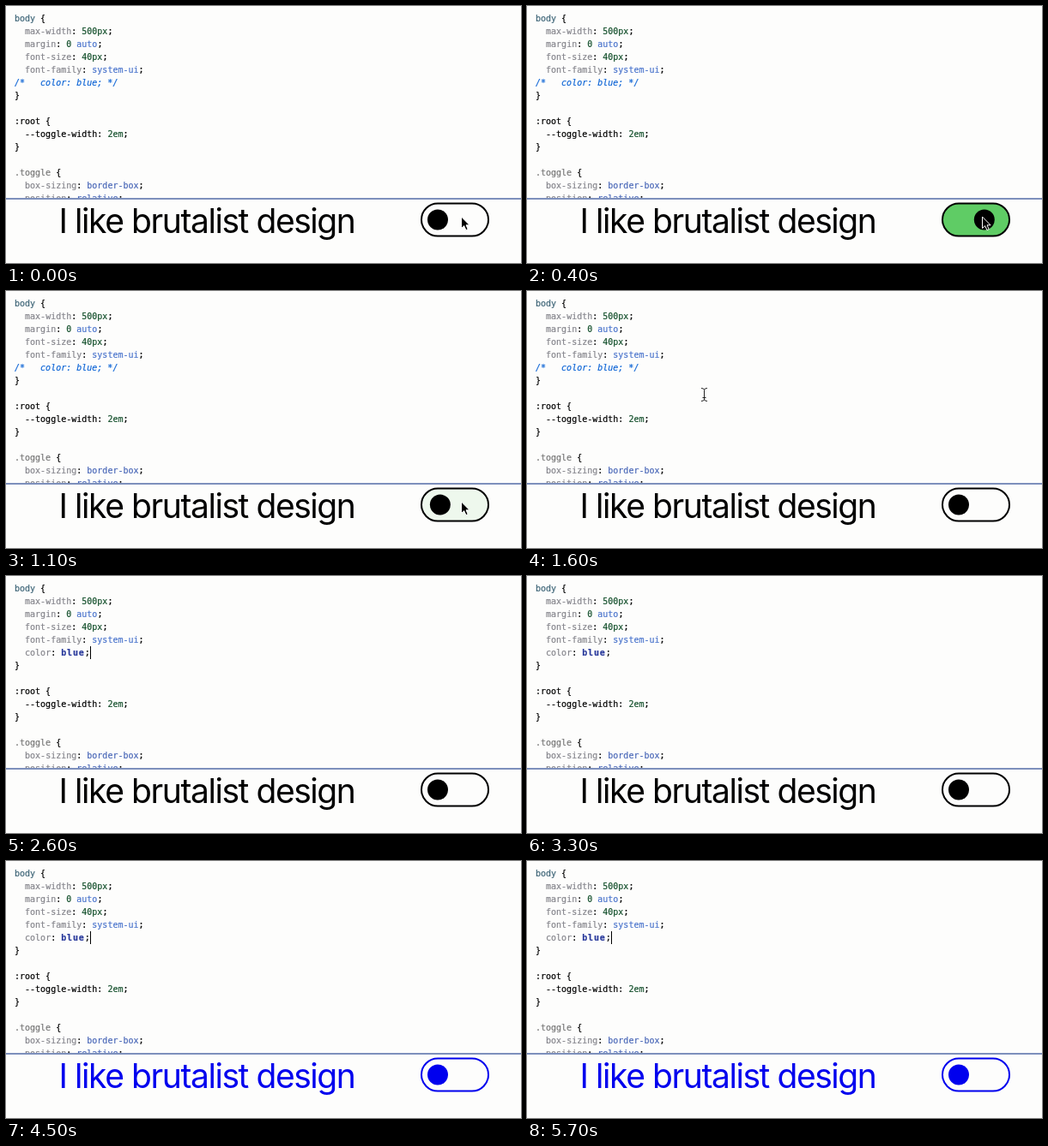
Recreate the animation shown at these times as an HTML page. Size 600 px wide and 300 px high, loop 5.8 s.

```html
<!DOCTYPE html>
<html lang="en">
<head>
<meta charset="utf-8">
<title>Toggle demo</title>
<style>
html, body { margin: 0; width: 100%; height: 100%; overflow: hidden; background: #fdfdfc; }
pre { position: absolute; left: 10px; top: 7px; margin: 0; height: 217px; overflow: hidden;
  font: 10px/15px "DejaVu Sans Mono", monospace; color: #000; -webkit-text-stroke: .2px; }
svg { position: absolute; left: 0; top: 0; }
#title { font: 39px Inter, sans-serif; letter-spacing: -1.43px; }
.tag { color: #3f6678; }
.cls { color: #777; }
.prop { color: #85858c; }
.num { color: #14502c; }
.atom { color: #4a74cc; }
.val { color: #4a68b8; }
.note { color: #0f66d6; font-style: italic; }
.key { color: #2a3a9c; font-weight: bold; letter-spacing: .85px; }
</style>
</head>
<body>
<pre><span class="tag">body</span> {
  <span class="prop">max-width</span>: <span class="num">500px</span>;
  <span class="prop">margin</span>: <span class="num">0</span> <span class="atom">auto</span>;
  <span class="prop">font-size</span>: <span class="num">40px</span>;
  <span class="prop">font-family</span>: <span class="atom">system-ui</span>;
<span id="line"></span>
}

:root {
  --toggle-width: <span class="num">2em</span>;
}

<span class="cls">.toggle</span> {
  <span class="prop">box-sizing</span>: <span class="val">border-box</span>;
  <span class="prop">position</span>: <span class="val">relative</span>;</pre>
<svg width="600" height="300">
  <defs>
    <path id="bar" d="M-3.5-7.5Q0-7.5 0-5.5Q0-7.5 3.5-7.5M0-5.5V6M-3.5 7.5Q0 7.5 0 5.5Q0 7.5 3.5 7.5M-2 3.5H2"/>
  </defs>
  <path d="M0 225H600" stroke="#7d90bc" stroke-width="2"/>
  <g id="demo">
    <text id="title" x="61.5" y="265" fill="currentColor">I like brutalist design</text>
    <rect id="track" x="484" y="230.5" width="78" height="38" rx="19" stroke="currentColor" stroke-width="2"/>
    <circle id="knob" cy="249.5" r="12" fill="currentColor"/>
  </g>
  <rect id="caret" y="82" width="1" height="15"/>
  <path id="arrow" d="M0 0V13.5L3.2 10.6L5.4 15.6L7.7 14.6L5.5 9.8H9.6Z" stroke="#fff"/>
  <g id="beam" fill="none">
    <use href="#bar" stroke="#fff" stroke-width="2.4" opacity=".6"/>
    <use href="#bar" stroke="#222"/>
  </g>
</svg>
<script>
const $ = id => document.getElementById(id);
const LOOP = 5800, EDIT = 2200, RECOLOR = 3400;
const comment = '<span class="note">/*   color: blue; */</span>';
const rule = '  <span class="prop">color</span>: <span class="key">blue</span>;';
const show = (id, on) => $(id).setAttribute('visibility', on ? 'visible' : 'hidden');
const place = (id, x, y) => $(id).setAttribute('transform', `translate(${x} ${y})`);
const ease = (t, start, length) => {
  const p = Math.min(1, Math.max(0, (t - start) / length));
  return p * p * (3 - 2 * p);
};
let edited;

function draw(t) {
  if (edited !== t >= EDIT) {
    edited = t >= EDIT;
    $('line').innerHTML = edited ? rule : comment;
  }
  $('demo').style.color = t < RECOLOR ? '#000' : '#00e';

  const on = ease(t, 200, 300) - ease(t, 850, 300);
  $('knob').setAttribute('cx', 503 + 40 * on);
  $('track').setAttribute('fill', `rgba(42,188,50,${on})`);

  // pointer leaves the switch and lands at the end of the comment
  const go = ease(t, 1250, 490);
  const x = 530.5 - 403 * go, y = 246 - 156 * go;
  show('arrow', t < EDIT && y >= 224);
  show('beam', t < EDIT && y < 224);
  place('arrow', x, y);
  place('beam', Math.floor(x) + .5, Math.round(y));

  $('caret').setAttribute('x', edited ? 98 : 130);
  show('caret', t >= 1900 && (t < 2500 || t % 1000 >= 500));
}

function frame(now) {
  draw(now % LOOP);
  requestAnimationFrame(frame);
}
frame(0);
</script>
</body>
</html>
```
